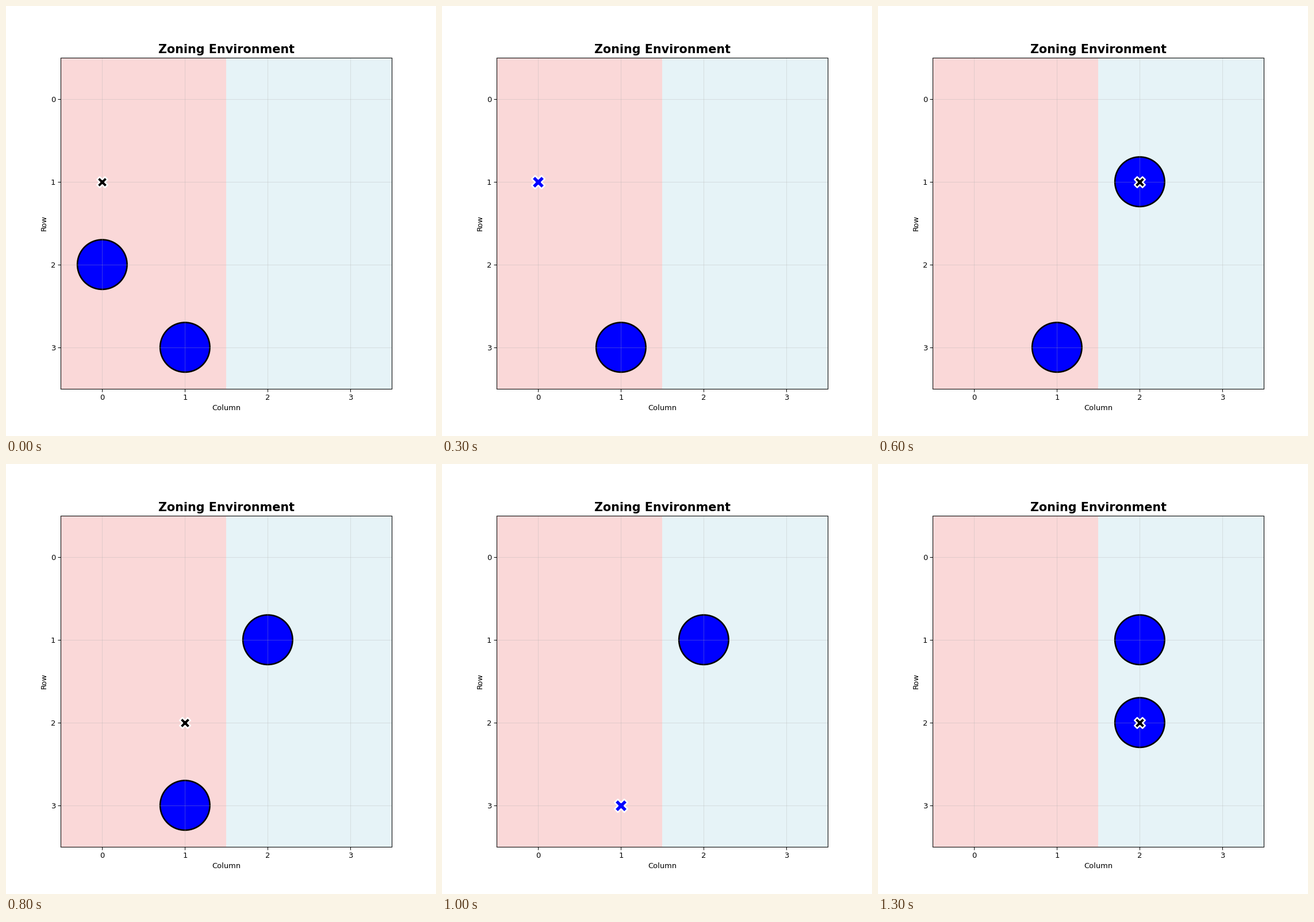
A matplotlib script for the animation above (1.4 s loop, 748 by 748 pixels).

```python
import matplotlib.pyplot as plt
from matplotlib.animation import FuncAnimation
from matplotlib.patches import Circle

plt.rcParams["font.family"] = "DejaVu Sans"

FRAME_MS = 100
SIZE = 4
START = (0, 1)
BLOCKS = [(0, 2), (1, 3)]
MOVES = {"U": (0, -1), "D": (0, 1), "L": (-1, 0), "R": (1, 0)}
# U/D/L/R move the agent, P picks a block up, X puts it down
ACTIONS = "DPURRXDLDPURX"


def simulate(actions):
    """Return (agent cell, carrying, resting blocks) after every action."""
    agent, carrying, blocks = START, False, set(BLOCKS)
    states = [(agent, carrying, sorted(blocks))]
    for action in actions:
        if action == "P":
            blocks.remove(agent)
            carrying = True
        elif action == "X":
            blocks.add(agent)
            carrying = False
        else:
            dx, dy = MOVES[action]
            agent = (agent[0] + dx, agent[1] + dy)
        states.append((agent, carrying, sorted(blocks)))
    return states


STATES = simulate(ACTIONS)

fig, ax = plt.subplots(figsize=(8, 8), dpi=93.5)
ax.set_xlim(-0.5, SIZE - 0.5)
ax.set_ylim(SIZE - 0.5, -0.5)
ax.set_aspect("equal")
ax.set_xticks(range(SIZE))
ax.set_yticks(range(SIZE))
ax.set_xlabel("Column")
ax.set_ylabel("Row")
ax.set_title("Zoning Environment", fontsize=16, fontweight="bold")
ax.grid(True, alpha=0.3)

for left, right, color in [(-0.5, 1.5, "lightcoral"), (1.5, 3.5, "lightblue")]:
    ax.axvspan(left, right, color=color, alpha=0.3, linewidth=0)

discs = [
    ax.add_patch(Circle(cell, 0.3, facecolor="blue", edgecolor="black", linewidth=2))
    for cell in BLOCKS
]
marker = ax.scatter(*START, marker="X", s=200, c="black",
                    edgecolors="white", linewidths=2, zorder=10)


def draw(frame):
    agent, carrying, blocks = STATES[frame]
    for i, disc in enumerate(discs):
        disc.set_visible(i < len(blocks))
        if i < len(blocks):
            disc.center = blocks[i]
    marker.set_offsets([agent])
    marker.set_facecolor("blue" if carrying else "black")
    marker.set_sizes([300 if carrying else 200])
    return [*discs, marker]


anim = FuncAnimation(fig, draw, frames=len(STATES), interval=FRAME_MS,
                     repeat=True, repeat_delay=0, blit=False)
plt.show()
```
